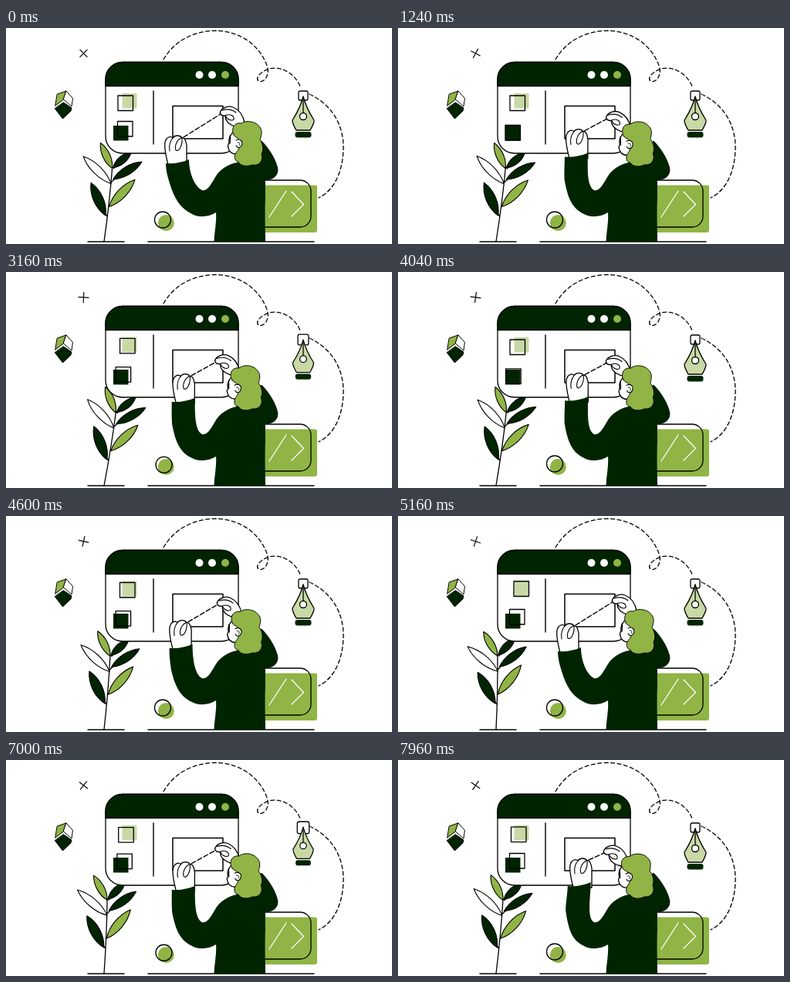
These frames come from a looping animation (500x281 px, 8000 ms). An HTML page with a canvas:

```html
<!DOCTYPE html>
<html lang="en">
<head>
<meta charset="utf-8">
<title>Designer at work</title>
<style>
html, body { margin: 0; width: 100%; height: 100%; overflow: hidden; background: #fff; }
canvas { display: block; width: 100vw; height: 100vh; }
</style>
</head>
<body>
<canvas id="stage"></canvas>
<script>
const W = 500, H = 281, LOOP = 8000;
const DARK = '#002400', GREEN = '#90b445', LIGHT = '#c8d9a5', WHITE = '#fff', INK = '#000';
const canvas = document.getElementById('stage');
const ctx = canvas.getContext('2d');

// Times of the main poses; every track gives one value per pose.
const TIMES = [0, 1240, 2320, 4040, 5160, 6040, 7960];
const TRACKS = {
  cross: [45, 28, 0, 8, 18, 43, 34],
  sway: [6.9, 7.9, 10.1, 8.5, 1.7, 0, 5.9],
  pinch: [0, 0.7, 0.5, 0.72, 0, 0.12, 1],
  tileA: [0, 0, 1, 0, 1, 0, 0.3],
  tileB: [0, 1, 0, 0.88, 0, 0.25, 0],
  dot: [0, 0, 1, 0, 0, 1, 0],
  pen: [0, 0, 0.5, 0, 0, 1, 0]
};

// Monotone cubic interpolation, so no track overshoots its poses.
function sample(values, t) {
  const last = TIMES.length - 1;
  if (t >= TIMES[last]) return values[last];
  let i = 0;
  while (t >= TIMES[i + 1]) i++;
  const slope = k => (values[k + 1] - values[k]) / (TIMES[k + 1] - TIMES[k]);
  const tangent = k => {
    if (k === 0 || k === last) return 0;
    const a = slope(k - 1), b = slope(k);
    return a * b <= 0 ? 0 : 2 * a * b / (a + b);
  };
  const h = TIMES[i + 1] - TIMES[i], u = (t - TIMES[i]) / h, v = 1 - u;
  return values[i] * (1 + 2 * u) * v * v + values[i + 1] * u * u * (3 - 2 * u)
    + h * u * v * (tangent(i) * v - tangent(i + 1) * u);
}

function paint(path, fill, stroke, width = 1.3) {
  if (fill) { ctx.fillStyle = fill; ctx.fill(path); }
  if (stroke) { ctx.strokeStyle = stroke; ctx.lineWidth = width; ctx.stroke(path); }
}
const shape = (d, fill, stroke, width) => paint(new Path2D(d), fill, stroke, width);

function box(x, y, w, h, r, fill, stroke, width) {
  const p = new Path2D();
  p.roundRect(x, y, w, h, r);
  paint(p, fill, stroke, width);
}

function circle(x, y, r, fill, stroke, width) {
  const p = new Path2D();
  p.arc(x, y, r, 0, Math.PI * 2);
  paint(p, fill, stroke, width);
}

function at(x, y, draw, degrees = 0) {
  ctx.save();
  ctx.translate(x, y);
  ctx.rotate(degrees * Math.PI / 180);
  draw();
  ctx.restore();
}

function dashes() {
  ctx.setLineDash([5, 3.5]);
  shape('M204 41 C222 10 253 3 274 3.5 C306 5 331 25 339 52 C341 63 334 71 328 69.5 C322 67 328 57 341 53 C359 49 375 61 381 76', null, INK);
  shape('M393 86 C425 101 438 130 437 158 C436 188 425 211 405 221', null, INK);
  ctx.setLineDash([]);
}

function cross(angle) {
  at(100.5, 33, () => shape('M-6.5 0 H6.5 M0 -6.5 V6.5', null, INK, 1.2), angle);
}

function cube() {
  shape('M66.5 86 L78 82 L74.5 93 L64 101 Z', GREEN, INK, 1);
  shape('M78 82 L86.5 91.5 L85 102 L74.5 93 Z', WHITE, INK, 1);
  shape('M74.5 97 L85 104 L84 108 L73.5 118 L63.5 105 Z', DARK, INK, 1);
}

function leaf(x, y, tx, ty, width, fill) {
  const dx = tx - x, dy = ty - y, len = Math.hypot(dx, dy);
  at(x, y, () => {
    ctx.rotate(Math.atan2(dy, dx));
    const b = width * 0.7;
    shape(`M0 0 C${len * 0.3} ${-b} ${len * 0.7} ${-b} ${len} 0 C${len * 0.7} ${b} ${len * 0.3} ${b} 0 0 Z`, fill, INK, 1.1);
  });
}

function plant(sway) {
  at(127, 278, () => {
    shape('M0 0 Q1 -50 -1 -98 M1 -96 L6 -104 M0 -78 L5 -84 M0 -76 L-6 -82 M0 -46 L5 -52 M0 -33 L-5 -40', null, INK);
    leaf(-1, -96, -20, -127, 9, GREEN);
    leaf(0, -97, 21, -120, 9, DARK);
    leaf(0, -76, -40, -107, 10.5, WHITE);
    leaf(2, -82, 36, -109, 10, DARK);
    leaf(-2, -34, -26, -74, 12, DARK);
    leaf(1, -46, 30, -85, 11, GREEN);
  }, sway);
}

function browser(tileA, tileB) {
  box(129, 44.5, 172, 118.5, 22, WHITE, INK);
  box(129, 44.5, 172, 31, [22, 22, 0, 0], DARK, INK);
  circle(250.5, 61, 5, WHITE);
  circle(267, 61, 5, WHITE);
  circle(284, 61, 5, GREEN);
  shape('M191 82 V151', null, INK, 1.4);
  box(150.5, 85, 19, 19.5, 0, LIGHT);
  box(145 + 5 * tileA, 88 - 3 * tileA, 19.5, 19.5, 0, null, INK);
  box(139, 127, 19.5, 19.5, 0, DARK);
  box(144.5 - 5.5 * tileB, 121.5 + 5 * tileB, 19.5, 19.5, 0, null, INK);
  box(216, 101.5, 65, 42.5, 0, null, INK, 1.5);
}

function codePanel() {
  box(320, 204.5, 83, 61.5, 3, GREEN);
  box(320, 198, 75, 61, 14, null, INK);
  shape('M341 246 L363 212 M370 213 L385.5 229.5 L370 245', null, WHITE, 1.3);
}

function pen(k) {
  at(385, 92 - 4 * k, () => {
    const s = 1 - 0.13 * k;
    const head = 12 + 7 * k;
    box(-head / 2, -4 + 4 * k - head / 2, head, head, 2 + k, WHITE, INK);
    ctx.scale(s, s);
    shape('M0 -3 C3 9 9 20 14 28 C14 33 11 37 9 41 H-9 C-11 37 -14 33 -14 28 C-9 20 -3 9 0 -3 Z', LIGHT, INK);
    shape('M0 0 V18', null, INK);
    circle(0, 23, 4.5, WHITE, INK);
    box(-10.5, 43, 21, 7.5, 3, DARK);
  });
}

function dot(k) {
  circle(207.3, 253.5, 10.5, GREEN);
  circle(203 + 3 * k, 249.5 + 2.5 * k, 10.5, null, INK);
}

function rightHand() {
  shape('M296 128 C288 125 284 120 284 114 C279 115 276 111 278 108 C281 103 288 101 294 103 C301 106 307 113 309 123 L305 130 Z', WHITE, INK);
  shape('M284 114 C290 111 296 114 295 119 C293 121 287 120 284 114 M280 107 C286 105 293 106 298 110', null, INK, 1.1);
}

function leftHand() {
  shape('M210 178 C207 166 204 153 206.5 147 C208 142 213 140 216 143 C219 139 225 139 228 143 C232 142 235 151 234 159 L234 178 Z', WHITE, INK);
  shape('M216 143 C212 148 211 154 212 160 M227 143 C221 146 218 154 220 159 C224 162 229 152 228 143', null, INK, 1.1);
}

function head() {
  shape('M296 134 C291 138 288 143 289 149 L287.5 153 C288 160 291 164 299 164 L312 170 L316 140 Z', WHITE, INK);
  shape('M290.5 140 L290 150', null, INK, 1.5);
  shape('M295 139 C291 132 295 122 305 124 C312 119 324 122 328 128 C333 133 331 140 329 145 C333 151 334 159 331 164 C334 173 327 180 319 178 C311 181 303 179 301 174 C295 173 295 165 299 161 C304 156 304 147 300 143 C298 142 296 141 295 139 Z', GREEN, INK, 0.9);
  shape('M298 146 C303 143 308 148 305 153 C303 157 299 156 298 153', WHITE, INK, 1.1);
  shape('M300 149 C303 148 304 151 302 153', null, INK, 0.9);
}

function body(dx, dy) {
  shape('M318 160 L331 147 C341 157 350 172 352 184 C352 193 345 198 335 197 L320 190 Z', DARK, INK, 0.8);
  const x = n => n + dx, y = n => n + dy;
  shape(`M${x(207)} ${y(176)} C${x(217)} ${y(177)} ${x(228)} ${y(175)} ${x(237)} ${y(171)}
    C${x(237)} ${y(188)} 244 206 254 211 C262 213 267 200 273 191 C280 181 292 176 303 174
    L330 174 C337 181 336 200 336 220 C335 243 336 261 336 278 H269.5 C270 265 273 252 272 240
    C262 246 250 247 241 242 C226 235 ${218 + dx * 0.2} 222 ${x(212) - dx * 0.6} ${y(202) - dy * 0.4}
    C${x(209) - dx * 0.3} ${y(193)} ${x(207)} ${y(184)} ${x(207)} ${y(176)} Z`, DARK);
}

function person(m) {
  const lx = 17 * m, ly = -12 * m, rx = -11 * m, ry = 9 * m;
  ctx.setLineDash([6, 3]);
  shape(`M${230 + lx} ${142 + ly} L${278 + rx} ${112 + ry}`, null, INK, 1.4);
  ctx.setLineDash([]);
  at(rx, ry, rightHand);
  at(lx, ly, leftHand);
  body(lx * 0.75, ly);
  // The head tips forward around the neck.
  at(318, 174, () => at(-318, -174, head), -6 * m);
}

function render(t) {
  const v = {};
  for (const key in TRACKS) v[key] = sample(TRACKS[key], t);
  ctx.setTransform(canvas.width / W, 0, 0, canvas.height / H, 0, 0);
  ctx.fillStyle = WHITE;
  ctx.fillRect(0, 0, W, H);
  ctx.lineJoin = ctx.lineCap = 'round';
  dashes();
  cross(v.cross);
  cube();
  plant(v.sway);
  browser(v.tileA, v.tileB);
  codePanel();
  pen(v.pen);
  dot(v.dot);
  shape('M106 278 H153 M184 278 H399', null, INK, 1.4);
  person(v.pinch);
}

function resize() {
  const ratio = window.devicePixelRatio || 1;
  canvas.width = Math.round(innerWidth * ratio);
  canvas.height = Math.round(innerHeight * ratio);
}
addEventListener('resize', resize);
resize();

const start = performance.now();
function tick() {
  render((performance.now() - start) % LOOP);
  requestAnimationFrame(tick);
}
tick();
</script>
</body>
</html>
```
